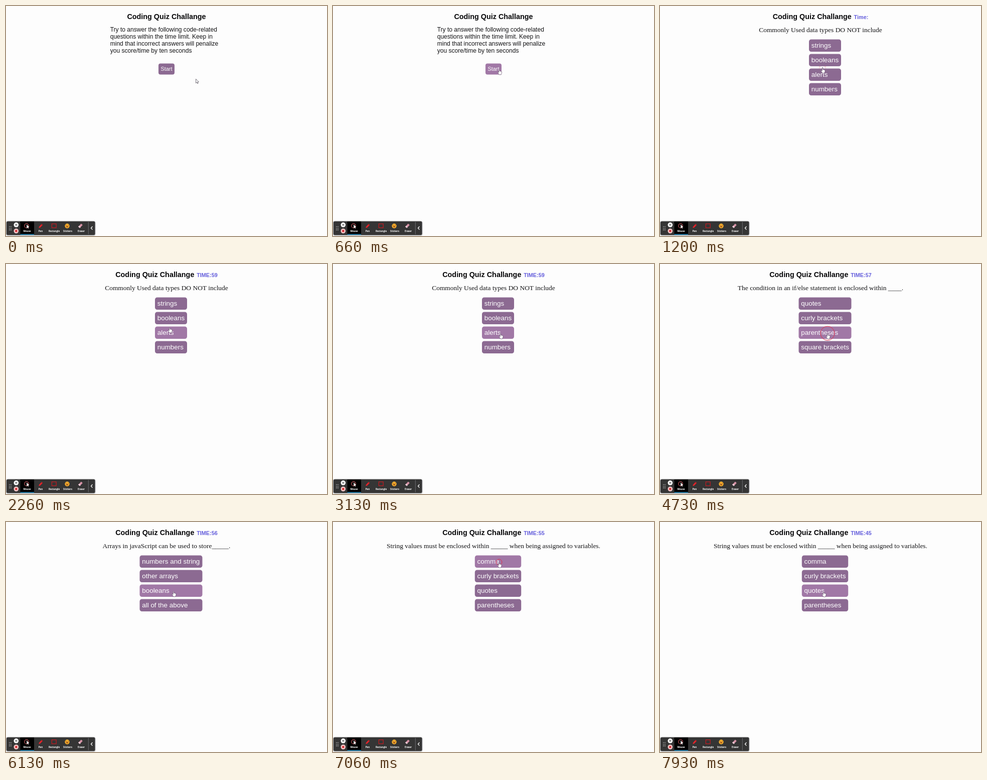
Recreate the animation shown at these times as an HTML page. Size 640 px wide and 458 px high, loop 8000 ms.

```html
<!DOCTYPE html>
<html lang="en">
<head>
<meta charset="utf-8">
<title>Coding quiz</title>
<style>
  html, body { margin: 0; width: 100%; height: 100%; overflow: hidden; background: #fdfdfd; }
  svg { display: block; width: 100vw; height: 100vh; }
  text { font-family: "Liberation Sans", Arial, sans-serif; white-space: pre; }
  .title { font-size: 14.36px; font-weight: bold; text-anchor: middle; fill: #060608; }
  .time { font-size: 10.85px; fill: #655fdc; }
  .intro { font-size: 12.06px; fill: #141416; }
  .question { font: 13.46px "Liberation Serif", "Times New Roman", serif; text-anchor: middle; fill: #141416; }
  .answer { font-size: 13.46px; fill: #fff; }
  .start { font-size: 10.9px; fill: #fff; text-anchor: middle; }
  .tool { font: bold 4.5px "Open Sans", "Noto Sans", sans-serif; fill: #fff; text-anchor: middle; }
</style>
</head>
<body>
<svg viewBox="0 0 640 458" xmlns="http://www.w3.org/2000/svg">
  <defs>
    <filter id="shadow" x="-10%" y="-40%" width="120%" height="180%">
      <feDropShadow dx="0" dy="0.5" stdDeviation="1" flood-opacity=".6"/>
    </filter>
  </defs>
  <rect width="640" height="458" fill="#fdfdfd"/>
  <text class="title" x="320" y="26">Coding Quiz Challange<tspan id="time" class="time" dx="4.8"></tspan></text>

  <g id="intro">
    <g id="lines"></g>
    <rect id="startBox" x="304" y="114.5" width="32" height="22" rx="4"/>
    <text class="start" x="320" y="129.3">Start</text>
  </g>

  <g id="quiz">
    <text id="question" class="question" x="320" y="51.5"></text>
    <g id="answers"></g>
  </g>

  <g id="toolbar">
    <rect x="1" y="428.7" width="176.5" height="27.3" rx="2.5" fill="#343436" filter="url(#shadow)"/>
    <rect x="28.5" y="429" width="27.5" height="26" fill="#000"/>
    <rect x="28.5" y="454" width="27.5" height="1.6" fill="#1683b8"/>
    <path d="M7 438.7v8M10 438.7v8" stroke="#ddd" stroke-width="1.3" stroke-dasharray="1.3 1.9"/>
    <circle cx="20.3" cy="435.8" r="4.8" fill="#fff"/>
    <path d="M19.2 434v3.6M21.5 434v3.6" stroke="#333" stroke-width="1.1"/>
    <circle cx="20.3" cy="448" r="4.8" fill="#f3c6c6"/>
    <rect x="18.3" y="446" width="4" height="4" rx=".5" fill="#d52f35"/>
    <circle cx="41" cy="437.7" r="4.2" fill="none" stroke="#d9646a" stroke-width="1.1"/>
    <path d="M41.3 435.3v7.2l1.7-1.5 1.2 2.3 1-.6-1.1-2.2 2.2-.2z" fill="#fff"/>
    <path d="M65.3 442.2l.8-3 4.8-5.3 2.3 2.1-5 5.2z" fill="#e5242b"/>
    <path d="M70 434.8l2.3 2.1" stroke="#8f1218" stroke-width=".7"/>
    <rect x="91.3" y="433.8" width="8.8" height="7.8" fill="none" stroke="#d3191f" stroke-width="1.1"/>
    <circle cx="122" cy="438" r="4.7" fill="#f4b02e"/>
    <path d="M119.2 438.5q2.8 4.6 5.6 0z" fill="#8d3d18"/>
    <path d="M119.2 436.5h1.6M123.2 436.5h1.6" stroke="#8d3d18" stroke-width="1"/>
    <path d="M144 439.5l5.8-6 3.1 2.5-5.7 6z" fill="#d994a8"/>
    <path d="M144 439.5l1.7-1.8 3.2 2.5-1.7 1.8z" fill="#f1d5dd"/>
    <path d="M164.3 430v24.5" stroke="#85858a" stroke-width=".7"/>
    <path d="M172.4 439l-2.9 3.2 2.9 3.2" fill="none" stroke="#fff" stroke-width="1.3"/>
    <g id="labels"></g>
  </g>

  <g id="click" fill="none" stroke="#e0304e">
    <circle id="ring" stroke-width="1"/>
    <g id="remnant">
      <path d="M-6.5 2v-4h3M6.5 2v-4h-3" stroke-width=".6" opacity=".5"/>
      <circle r=".9" fill="#98708f" stroke="none"/>
    </g>
  </g>

  <g id="cursor" stroke="#3b3542" stroke-width=".7" stroke-linejoin="round" fill="#fff">
    <path id="arrow" d="M.6.3v8.2l1.9-1.7 1.3 2.8 1.3-.6-1.3-2.7 2.6-.2z"/>
    <path id="hand" d="M-.9 1q.8-1.6 1.6 0v3q1-.7 1.6.2 1-.5 1.5.3 1.1-.2 1.2.8v2.5q-.2 1.2-1 2v1.2h-4.200q-.3-1.200-1.400-2.300l-1.700-2.400q.2-1.300 1.600-.4l.8.9z" stroke="#5c4563"/>
  </g>
</svg>

<script>
const LOOP = 8000, RING_LIFE = 330, ANSWER_DELAY = 190;
const BASE = '#8c6a92', HOVER = '#a178a6';
const NS = 'http://www.w3.org/2000/svg';
const el = id => document.getElementById(id);

const clicks = [930, 3200, 4730, 6870];
const questions = [
  ['Commonly Used data types DO NOT include', 64, 'strings', 'booleans', 'alerts', 'numbers'],
  ['The condition in an if/else statement is enclosed within ____.', 105, 'quotes', 'curly brackets', 'parentheses', 'square brackets'],
  ['Arrays in javaScript can be used to store_____.', 125, 'numbers and string', 'other arrays', 'booleans', 'all of the above'],
  ['String values must be enclosed within _____ when being assigned to variables.', 92.4, 'comma', 'curly brackets', 'quotes', 'parentheses']
];
// Pointer tip: time, x, y
const path = [
  [0, 378, 145], [860, 324, 122.7], [2000, 324, 122.7], [2800, 333, 136], [3060, 334, 138],
  [6100, 334, 138], [6800, 331, 80], [7060, 331, 80], [7860, 326, 138], [LOOP, 326, 138]
];

function add(parent, tag, attrs, text = '') {
  const node = document.createElementNS(NS, tag);
  for (const key in attrs) node.setAttribute(key, attrs[key]);
  node.textContent = text;
  parent.append(node);
  return node;
}
const set = (node, attrs) => { for (const key in attrs) node.setAttribute(key, attrs[key]); };
const show = (node, on) => node.setAttribute('visibility', on ? 'inherit' : 'hidden');

['Try to answer the following code-related',
 'questions within the time limit. Keep in',
 'mind that incorrect answers will penalize',
 'you score/time by ten seconds'
].forEach((line, i) => add(el('lines'), 'text', { class: 'intro', x: 207.7, y: 50.5 + 14 * i }, line));

[['Mouse', 42], ['Pen', 69], ['Rectangle', 96], ['Stickers', 123], ['Eraser', 150]]
  .forEach(([name, x]) => add(el('labels'), 'text', { class: 'tool', x, y: 450.3 }, name));

const rows = [0, 1, 2, 3].map(i => {
  const top = 66.5 + 29 * i;
  return {
    top,
    box: add(el('answers'), 'rect', { y: top, height: 24.5, rx: 4.5 }),
    label: add(el('answers'), 'text', { class: 'answer', y: top + 16.5 })
  };
});

function pointerAt(t) {
  const i = path.findIndex((p, n) => n && t <= p[0]);
  const [t0, x0, y0] = path[i - 1], [t1, x1, y1] = path[i];
  const u = (t - t0) / (t1 - t0), k = u * u * (3 - 2 * u);
  return [x0 + (x1 - x0) * k, y0 + (y1 - y0) * k];
}

function timeLabel(t) {
  if (t < clicks[0] + ANSWER_DELAY) return '';
  if (t < 2200) return 'Time:';
  return 'TIME:' + (t < 7200 ? 60 - Math.floor((t - 1200) / 1000) : 45);
}

function drawQuiz([prompt, width, ...answers], x, y) {
  const left = 329 - width / 2;
  el('question').textContent = prompt;
  rows.forEach(({ top, box, label }, i) => {
    const over = Math.abs(x - 329) < width / 2 && y >= top && y <= top + 24.5;
    set(box, { x: left, width, fill: over ? HOVER : BASE });
    label.setAttribute('x', left + 4.7);
    label.textContent = answers[i];
  });
}

function render(t) {
  const [x, y] = pointerAt(t);
  const step = clicks.filter(c => t >= c + ANSWER_DELAY).length;
  const overStart = Math.abs(x - 320) < 16 && y >= 114.5 && y <= 136.5;
  const hand = step > 0 || overStart;

  el('time').textContent = timeLabel(t);
  show(el('intro'), !step);
  show(el('quiz'), step);
  el('startBox').setAttribute('fill', overStart ? HOVER : BASE);
  if (step) drawQuiz(questions[step - 1], x, y);

  const press = clicks.find(c => t >= c && t < c + RING_LIFE);
  show(el('click'), press !== undefined);
  if (press !== undefined) {
    const u = (t - press) / RING_LIFE;
    el('click').setAttribute('transform', `translate(${x} ${y})`);
    el('ring').setAttribute('r', 14 * (1 - u));
    show(el('ring'), u < .75);
    show(el('remnant'), u >= .75);
  }

  el('cursor').setAttribute('transform', `translate(${x} ${y})`);
  show(el('arrow'), !hand);
  show(el('hand'), hand);
}

const began = performance.now();
function frame() {
  render((performance.now() - began) % LOOP);
  requestAnimationFrame(frame);
}
render(0);
requestAnimationFrame(frame);
</script>
</body>
</html>
```
